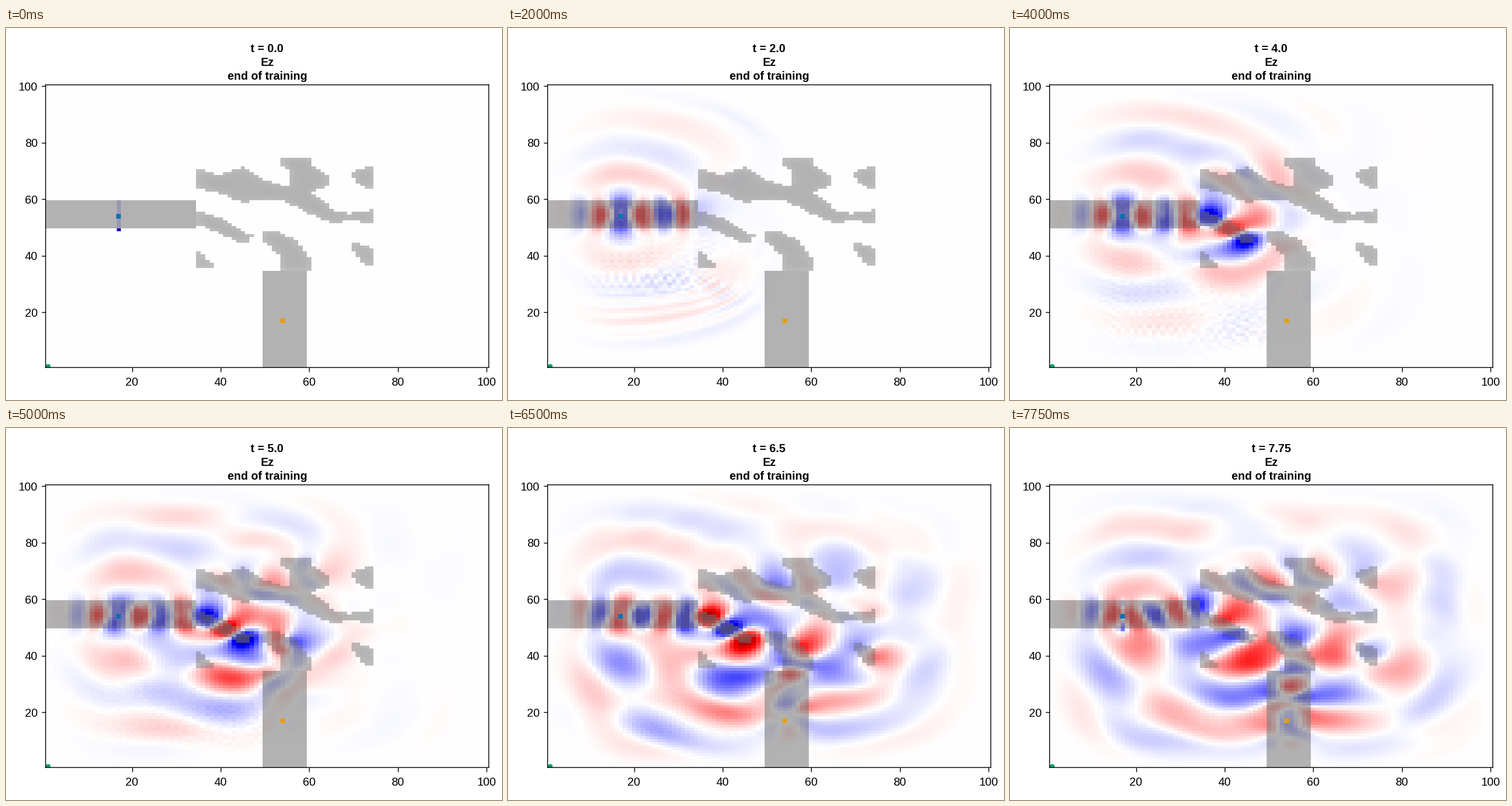
Animation of 864 by 648 pixels, one loop 8000 ms. Source, as a matplotlib script:

```python
import numpy as np
import matplotlib.pyplot as plt
from matplotlib.animation import FuncAnimation

plt.rcParams["font.family"] = "Liberation Sans"

W, H, DPI = 864, 648, 100
LEFT, RIGHT, TOP, BOTTOM = 69, 841, 99, 591.4
N = 100                    # cells per side
FRAMES, INTERVAL = 32, 250
STEPS = 15                 # solver steps per frame, a quarter period
WAVELENGTH = 31.0          # vacuum wavelength in cells
N_CLAD, N_CORE = 1.46, 3.37
PML = 16
RANGE = 0.36               # field value at the ends of the colormap


def arm(mask, *knots):
    """Fill a strip through (column, middle row, half height) knots."""
    x, mid, half = zip(*knots)
    cols = np.arange(x[0], x[-1] + 1)
    rows = np.arange(1, N + 1)[:, None]
    inside = abs(rows - np.interp(cols, x, mid)) <= np.interp(cols, x, half)
    mask[:, cols - 1] += inside


def box_blur(a):
    p = np.pad(a, 1, mode="edge")
    return sum(p[i:i + N, j:j + N] for i in range(3) for j in range(3)) / 9


def make_device():
    m = np.zeros((N, N))
    # upper arm and the island on top of it
    arm(m, (35, 67, 3.5), (40, 65.3, 3.3), (45, 65, 6.4), (49, 63.5, 4), (54, 62, 2.5),
        (58, 60, 3.5), (62, 57, 3.5), (66, 53.5, 2), (69, 53.8, 1.2), (74, 53.8, 2.3))
    arm(m, (54, 73, 1.6), (55, 72.5, 2.1), (56, 68.5, 6), (60, 68.5, 6), (61, 67, 4.6),
        (64, 66.5, 2.1))
    # right islands
    arm(m, (70, 68.5, 1), (72, 67.5, 3), (74, 67.5, 4))
    arm(m, (70, 43, 1.6), (72, 40.5, 3), (74, 39.5, 3))
    # lower arm and the small island below it
    arm(m, (35, 53.2, 2.4), (41, 49.7, 2.8), (44, 47, 2.6), (46, 46, 1.6), (47, 47, 0.5))
    arm(m, (35, 38.5, 3), (38, 36.5, 1))
    # bend into the output guide
    arm(m, (50, 46.5, 2.1), (53, 44.5, 4.1), (54, 41, 6.6), (57, 40, 5.6), (60, 37, 2.6))
    m = np.minimum(m, 1)
    fill = m * (0.72 + 0.28 * box_blur(box_blur(m)))
    fill[49:59, :34] = 1
    fill[:34, 49:59] = 1
    return fill


def simulate(fill):
    """2D wave solver with a line current; returns the field at every frame."""
    eps = N_CLAD**2 + fill * (N_CORE**2 - N_CLAD**2)
    dt = WAVELENGTH / (4 * STEPS)
    i = np.arange(N)
    depth = np.maximum(0, np.maximum(PML - i, i - (N - 1 - PML))) / PML
    loss = 0.42 * (depth[:, None]**2 + depth[None, :]**2) / eps**0.25
    damp = np.exp(-loss * dt)
    damp_x = (damp[1:] + damp[:-1]) / 2
    damp_y = (damp[:, 1:] + damp[:, :-1]) / 2

    ez = np.zeros((N, N))
    hx = np.zeros((N - 1, N))
    hy = np.zeros((N, N - 1))
    gain = dt / eps
    fields = []
    for step in range((FRAMES - 1) * STEPS + 1):
        curl = np.zeros((N, N))
        curl[1:-1, 1:-1] = np.diff(hy, axis=1)[1:-1] - np.diff(hx, axis=0)[:, 1:-1]
        curl[48:59, 16] -= np.cos(2 * np.pi * step / (4 * STEPS))
        ez = damp * ez + gain * curl
        if step % STEPS == 0:
            fields.append(ez)
        hx = damp_x * hx - dt * np.diff(ez, axis=0)
        hy = damp_y * hy + dt * np.diff(ez, axis=1)
    return fields


device = make_device()
fields = simulate(device)
alpha = 0.6 * device[..., None]
cmap = plt.get_cmap("seismic", 1024)


def picture(field):
    rgb = cmap(np.clip(0.5 + 0.5 * field / RANGE, 0, 1))[..., :3]
    return rgb * (1 - alpha) + 0.5 * alpha


fig = plt.figure(figsize=(W / DPI, H / DPI), dpi=DPI, facecolor="white")
ax = fig.add_axes([LEFT / W, 1 - BOTTOM / H, (RIGHT - LEFT) / W, (BOTTOM - TOP) / H])
px = 72 / DPI


def label(x, y, s, **kw):
    return fig.text(x / W, 1 - y / H, s, fontsize=20 * px, color="black",
                    va="baseline", **kw)


image = ax.imshow(picture(fields[0]), origin="lower", aspect="auto",
                  interpolation="nearest", extent=(0.5, N + 0.5, 0.5, N + 0.5))
for x, y, shape, color in ((1, 1, "o", "#009E73"), (17, 54, "s", "#0072B2"),
                           (54, 17, "s", "#E69F00")):
    ax.plot(x, y, shape, ms=8.4 * px, mfc=color, mew=0)
ax.set_xlim(0.5, N + 0.5)
ax.set_ylim(0.5, N + 0.5)
ticks = range(20, 101, 20)
ax.set_xticks(ticks)
ax.set_yticks(ticks)
ax.tick_params(length=7.5 * px, width=1.45 * px, labelbottom=False, labelleft=False)
for spine in ax.spines.values():
    spine.set_linewidth(1.45 * px)
    spine.set_snap(False)

for v in ticks:
    label(LEFT + (v - 0.5) * (RIGHT - LEFT) / N, 623, str(v), ha="center")
    label(55, BOTTOM - (v - 0.5) * (BOTTOM - TOP) / N + 7.3, str(v), ha="right")

title = dict(ha="center", weight="bold")
clock = label(455, 42.5, "t = 0.0", **title)
label(455, 66, "Ez", **title)
label(455, 89.5, "end of training", **title)


def draw(k):
    image.set_data(picture(fields[k]))
    clock.set_text(f"t = {k / 4}")
    return image, clock


anim = FuncAnimation(fig, draw, frames=FRAMES, interval=INTERVAL, repeat=True,
                     repeat_delay=0, blit=False)
plt.show()
```
